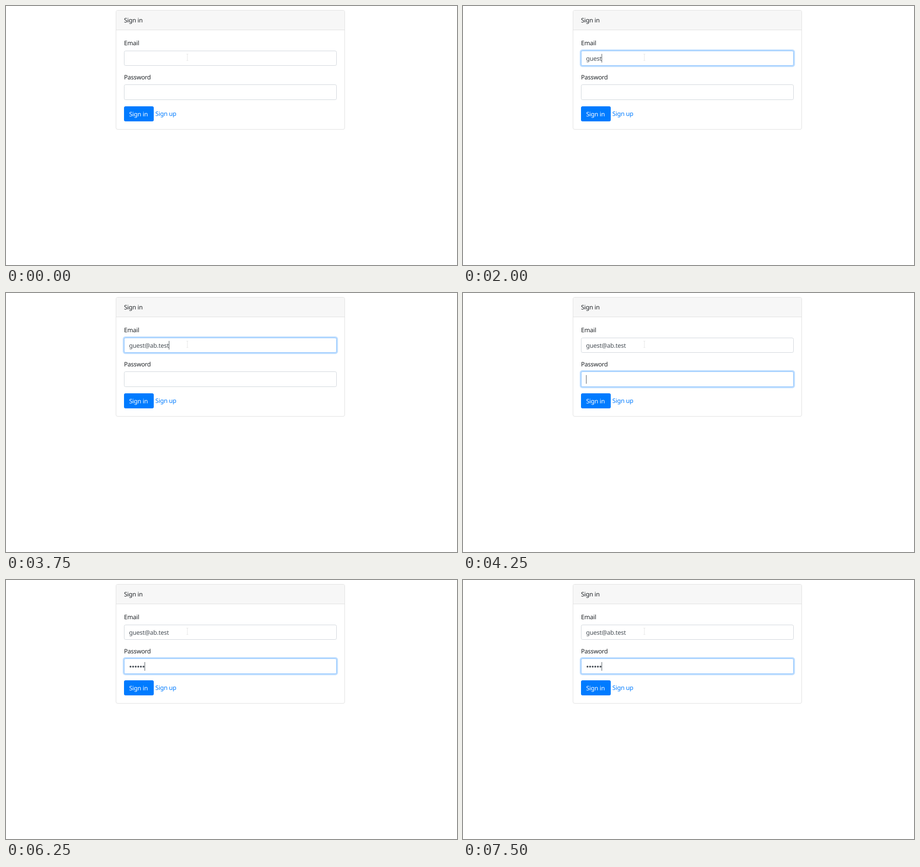
These frames come from a looping animation (986x568 px, 8 s). An HTML page:

```html
<!DOCTYPE html>
<html lang="en">
<head>
<meta charset="utf-8">
<title>Sign in</title>
<style>
  html, body { margin: 0; width: 100%; height: 100%; overflow: hidden; background: #fff; }
  svg { display: block; }
  text {
    font: 13.4px "Noto Sans", "Open Sans", sans-serif;
    letter-spacing: -.0187em;
    fill: #212529;
    text-rendering: geometricPrecision;
  }
  .card { fill: #fff; stroke: #dfdfdf; }
  .head { fill: #f7f7f7; }
  .box { fill: #fff; stroke: #ced4da; }
  .ring { fill: #bfdeff; visibility: hidden; }
  .focus .ring { visibility: visible; }
  .focus .box { stroke: #80bdff; }
  .value { fill: #495057; }
  .link { fill: #007bff; }
  .white { fill: #fff; }
  .beam { fill: none; stroke: #e6e6e6; }
  .panel { fill: #fff; stroke: #c4c4c4; filter: drop-shadow(0 1px 2px rgba(0, 0, 0, .4)); }
  .ok { fill: #1a73e8; stroke: #4c92ef; stroke-width: 1.5; }
  #alert .msg { font-size: 11px; }
  #alert .white { font-size: 10.4px; font-weight: 700; letter-spacing: 0; }
</style>
</head>
<body>
<svg width="986" height="568" viewBox="0 0 986 568">
  <rect class="card" x="240.5" y="9.5" width="500" height="261" rx="3.5"/>
  <path class="head" d="M241 52V13a3 3 0 0 1 3-3H737a3 3 0 0 1 3 3V52Z"/>
  <path d="M241 52.5H740" stroke="#dfdfdf"/>
  <text x="258" y="36">Sign in</text>

  <text x="258" y="86">Email</text>
  <g id="email">
    <rect class="ring" x="255.3" y="95.3" width="470.4" height="38.4" rx="5.5"/>
    <rect class="box" x="258.5" y="98.5" width="464" height="32" rx="3"/>
    <text class="value" id="address" x="269" y="120"></text>
  </g>

  <text x="258" y="161">Password</text>
  <g id="password">
    <rect class="ring" x="255.3" y="169.3" width="470.4" height="39.4" rx="5.5"/>
    <rect class="box" x="258.5" y="172.5" width="464" height="33" rx="3"/>
    <g class="value" id="dots"></g>
  </g>

  <rect x="258" y="220" width="65" height="33" rx="3.5" fill="#007bff"/>
  <text class="white" x="269.2" y="242">Sign in</text>
  <text class="link" x="326.6" y="241">Sign up</text>

  <rect class="value" id="caret" width="1" height="19"/>
  <path class="beam" d="M394.5 105.5h4M396.5 106V119M394.5 119.5h4"/>

  <g id="alert">
    <rect class="panel" x="295.5" y="-20" width="389.5" height="97" rx="3"/>
    <text class="msg" x="309" y="18">Wrong email or password! Please try again!</text>
    <rect class="ok" x="615.3" y="35.5" width="56.4" height="28.5" rx="2.5"/>
    <text class="white" x="642.7" y="53" text-anchor="middle">OK</text>
  </g>
</svg>
<script>
const LOOP = 8000;
const ADDRESS = 'guest@ab.test';
const LEFT = 269.6;
const DOT_STEP = 5.67;

// [start ms, field, characters typed, caret shown]
const STEPS = [
  [0, '', 0, 0],
  [250, 'email', 0, 1],
  [750, 'email', 0, 0],
  [1000, 'email', 1, 1],
  [1250, 'email', 2, 1],
  [1500, 'email', 4, 1],
  [2000, 'email', 5, 1],
  [2500, 'email', 6, 1],
  [3000, 'email', 8, 1],
  [3250, 'email', 9, 1],
  [3500, 'email', 11, 1],
  [3750, 'email', 13, 1],
  [4250, 'password', 0, 1],
  [4750, 'password', 0, 0],
  [5250, 'password', 1, 1],
  [5500, 'password', 2, 1],
  [5750, 'password', 3, 1],
  [6000, 'password', 5, 1],
  [6250, 'password', 6, 1]
];
const ALERT = [6750, 7500];

const $ = id => document.getElementById(id);
const show = (el, on) => { el.style.visibility = on ? 'visible' : 'hidden'; };

for (let i = 0; i < 6; i++) {
  const dot = document.createElementNS('http://www.w3.org/2000/svg', 'circle');
  dot.setAttribute('cx', 272.2 + i * DOT_STEP);
  dot.setAttribute('cy', 190);
  dot.setAttribute('r', 2.05);
  $('dots').append(dot);
}

function draw() {
  const t = performance.now() % LOOP;
  const [, field, count, caretOn] = STEPS.findLast(step => step[0] <= t);
  const inPassword = field === 'password';

  for (const id of ['email', 'password']) $(id).classList.toggle('focus', id === field);
  $('address').textContent = inPassword ? ADDRESS : ADDRESS.slice(0, count);
  [...$('dots').children].forEach((dot, i) => show(dot, inPassword && i < count));

  const width = inPassword ? count * DOT_STEP : count && $('address').getComputedTextLength();
  $('caret').setAttribute('x', Math.floor(LEFT + width));
  $('caret').setAttribute('y', inPassword ? 180 : 105);
  show($('caret'), caretOn);
  show($('alert'), t >= ALERT[0] && t < ALERT[1]);

  requestAnimationFrame(draw);
}
draw();
</script>
</body>
</html>
```
